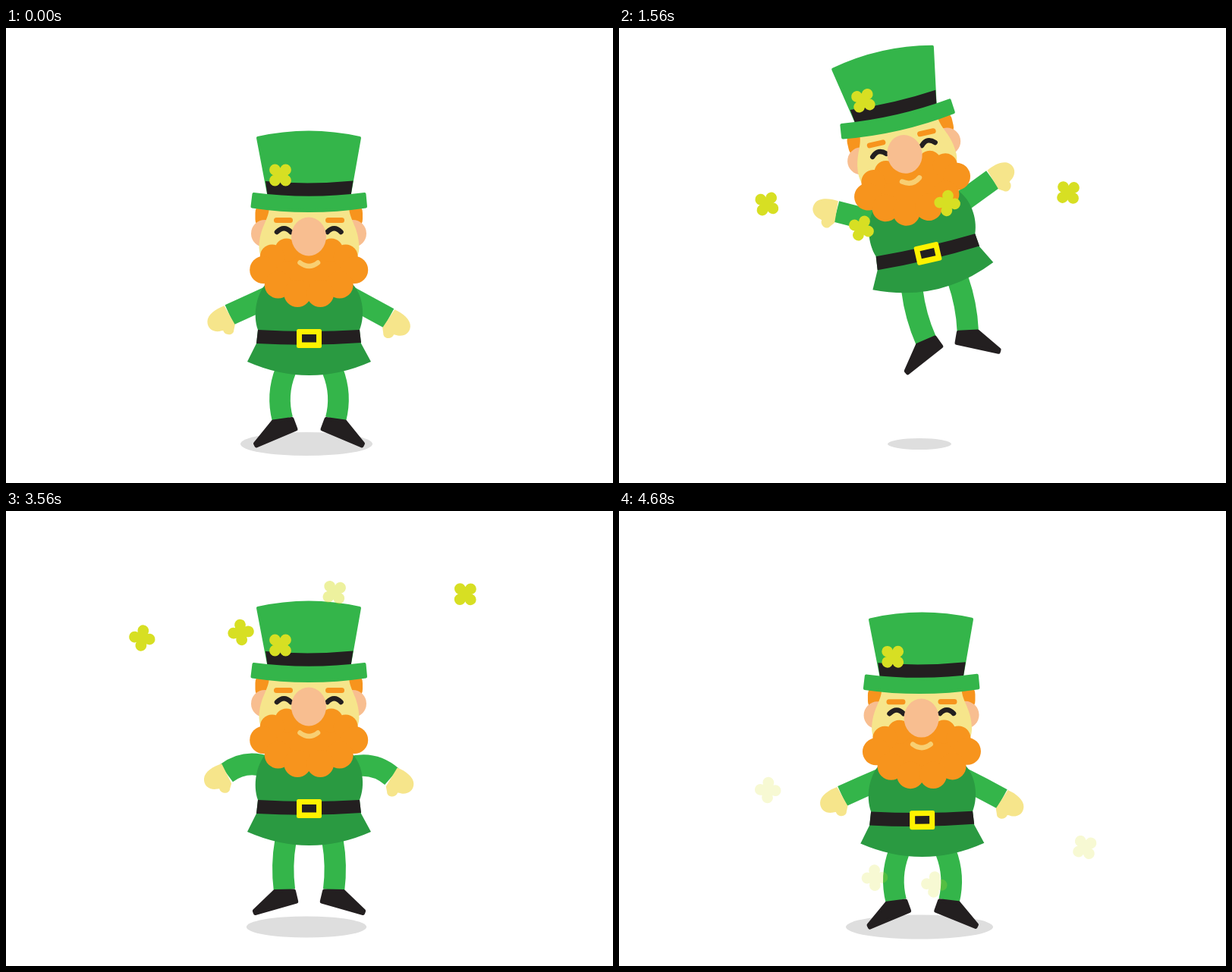
Recreate the animation shown at these times as an HTML page with a canvas. Size 800 px wide and 600 px high, loop 4720 ms.

```html
<!DOCTYPE html>
<html>
<head>
<meta charset="utf-8">
<style>
html, body { margin: 0; height: 100%; overflow: hidden; background: #fff; }
canvas { display: block; }
</style>
</head>
<body>
<canvas id="stage" width="800" height="600"></canvas>
<script>
const ctx = document.getElementById('stage').getContext('2d');
const LOOP = 2360, STEP = 40, CX = 399.5, CY = 409;
const GREEN = '#34b54a', DARK = '#2a9a41', BLACK = '#231f20', SKIN = '#f6e58b',
      PINK = '#f8be90', ORANGE = '#f7941d', LIME = '#d7df23';

// Limb positions are relative to the buckle, for the left side; swing shifts both feet sideways.
const stand = { dx: 0, dy: 0, tilt: 0, footX: -35, footY: 107, shoe: 0, swing: 0, handX: -105, handY: -28.5, elbow: 0 };
const crouch = { ...stand, dy: 6, footX: -39, footY: 101, shoe: -13, handX: -109, handY: -39, elbow: 15 };
const rise = { ...stand, dy: -17, footX: -32.5, footY: 108, shoe: 7, handX: -109, handY: -44, elbow: 15 };
const fly = { ...stand, dx: 7, dy: -112.5, tilt: -12.9, footX: -28.5, footY: 112, handY: -76 };
const kick = { ...fly, dx: 9.5, dy: -90, tilt: -11.85, footX: -27.5, footY: 101, shoe: -34, swing: 10.5, handY: -88 };
const land = { ...rise, dx: 3, dy: -34, tilt: -4.5, elbow: 6 };
const MOVES = [[0, stand], [440, crouch], [880, crouch], [1200, rise], [1520, fly], [1880, kick], [2140, land], [LOOP, stand]];

const CLOVERS = [
  { start: 470, x: 191.5, y: 232, speed: .179, sway: 14.5, low: 1030, period: 1850, turn: -9, spin: .076 },
  { start: 800, x: 325.5, y: 264, speed: .289, sway: 16, low: 1230, period: 1750, turn: 69, spin: .084 },
  { start: 1130, x: 416.4, y: 231, speed: .344, sway: 26, low: 2012, period: 1265, turn: 50, spin: .118 },
  { start: 890, x: 611, y: 217, speed: .298, sway: 20, low: 1680, period: 2350, turn: 4, spin: .009 }];

const clamp = v => Math.max(0, Math.min(1, v));
const smooth = v => (v = clamp(v)) * v * (3 - 2 * v);

// Monotone cubic blend between neighbouring poses
function poseAt(t) {
  let i = 0;
  while (t >= MOVES[i + 1][0]) i++;
  const slope = (k, key) => (MOVES[k + 1][1][key] - MOVES[k][1][key]) / (MOVES[k + 1][0] - MOVES[k][0]);
  const tangent = (k, key) => {
    if (k < 1 || k > MOVES.length - 2) return 0;
    const a = slope(k - 1, key), b = slope(k, key);
    return a * b > 0 ? 2 * a * b / (a + b) : 0;
  };
  const [[t0, from], [t1, to]] = MOVES.slice(i, i + 2);
  const span = t1 - t0, u = (t - t0) / span, v = 1 - u, pose = {};
  for (const key in from) {
    pose[key] = from[key] + (to[key] - from[key]) * smooth(u) +
      span * u * v * (tangent(i, key) * v - tangent(i + 1, key) * u);
  }
  return pose;
}

function fill(color, d, round = 0) {
  const path = new Path2D(d);
  ctx.fillStyle = ctx.strokeStyle = color;
  ctx.fill(path);
  if (round) {
    ctx.lineWidth = round;
    ctx.lineJoin = 'round';
    ctx.stroke(path);
  }
}
function line(color, width, d, cap = 'round') {
  ctx.strokeStyle = color;
  ctx.lineWidth = width;
  ctx.lineCap = cap;
  ctx.stroke(new Path2D(d));
}
function oval(color, x, y, rx, ry = rx) {
  ctx.fillStyle = color;
  ctx.beginPath();
  ctx.ellipse(x, y, rx, ry, 0, 0, 7);
  ctx.fill();
}
function rect(color, x, y, w, h, r) {
  ctx.fillStyle = color;
  ctx.beginPath();
  ctx.roundRect(x, y, w, h, r);
  ctx.fill();
}
function at(x, y, deg, draw) {
  ctx.save();
  ctx.translate(x, y);
  ctx.rotate(deg * Math.PI / 180);
  draw();
  ctx.restore();
}
function mirrored(draw) {
  for (const side of [1, -1]) {
    ctx.save();
    ctx.scale(side, 1);
    draw(side);
    ctx.restore();
  }
}

function clover(x, y, deg) {
  at(x, y, deg, () => {
    ctx.fillStyle = LIME;
    ctx.beginPath();
    for (const cx of [-7, 7]) for (const cy of [-7, 7]) {
      ctx.moveTo(cx, cy);
      ctx.arc(cx, cy, 7.4, 0, 2 * Math.PI);
    }
    ctx.rect(-6, -6, 12, 12);
    ctx.fill();
  });
}

// A tube from one joint to the other, bowed outwards
function limb(x0, y0, x1, y1, bend, width) {
  const dx = x1 - x0, dy = y1 - y0, length = Math.hypot(dx, dy);
  const kx = (x0 + x1) / 2 - dy / length * bend, ky = (y0 + y1) / 2 + dx / length * bend;
  line(GREEN, width, `M${x0} ${y0} Q${kx} ${ky} ${x1} ${y1}`, 'butt');
}

function leg(pose, side) {
  const hipX = -31, hipY = 43, length = 65;
  const x = pose.footX + pose.swing * side, y = pose.footY;
  const reach = Math.hypot(x - hipX, y - hipY);
  const bend = Math.max(5, Math.sqrt(Math.max(0, length ** 2 - reach ** 2)));
  limb(hipX, hipY, x, y, bend, 29 - bend * .13);
  at(x, y, pose.shoe - pose.swing * side * .4, () =>
    fill(BLACK, 'M-12.5 3 L12.5 -.5 L17.5 13 L-34.5 35 L-36 32 Z', 5));
}

function arm(pose, side) {
  const shoulder = -54, x = pose.handX, y = pose.handY - 2.3 * side;
  limb(shoulder, shoulder, x, y, pose.elbow, 28.5);
  const lift = Math.atan2(shoulder - y, shoulder - x) * 180 / Math.PI;
  at(x, y, 25 + lift * -1 * -1 - pose.elbow * .9, () => fill(SKIN,
    'M-7 -12 C-18 -8 -29 0 -29 9 C-29 18 -22 23 -13 22 Q-10 21 -8 21 C-6 28 6 28 6 20 L7.5 13 Z'));
}

function torso() {
  fill(DARK, 'M342 338 C330 352 325 378 332 398 L330 416 L318 440 Q400 476 481 440 L468 416 L466 398 C474 378 470 352 457 338 Z');
  fill(BLACK, 'M332 398 Q400 402 466 398 L468 415 Q400 420 330 416 Z');
  rect('#fff200', 383, 397, 33, 25, 2.5);
  rect(BLACK, 390, 404, 19, 10.5, 0);
}

function head() {
  rect(ORANGE, 328.5, 230, 141.5, 36, 14);
  oval(PINK, 341, 271, 18);
  oval(PINK, 457, 271, 18);
  fill(SKIN, 'M347 236 C346 255 334 262 333.5 290 Q335 310 350 320 L449 320 Q464 310 465.5 290 C465 262 453 255 452 236 Z');
  rect(ORANGE, 353, 250, 25, 7, 3.5);
  rect(ORANGE, 421, 250, 25, 7, 3.5);
  line(BLACK, 6.5, 'M357 269 Q366.5 259.5 375.5 269 M423.5 269 Q432.5 259.5 441.5 269');

  oval(ORANGE, 399.2, 317, 60, 33);
  for (const [dx, y, r] of [[29.5, 293, 15.5], [48.5, 301.5, 16], [60, 319, 18], [40.5, 338.5, 18], [15, 350, 18]]) {
    oval(ORANGE, 399.2 - dx, y, r);
    oval(ORANGE, 399.2 + dx, y, r);
  }
  line('#f8cf72', 6.5, 'M387.5 309.5 Q399.5 318.5 411 309.5');
  oval(PINK, 399, 275, 23, 25.5);
}

function hat() {
  fill(GREEN, 'M332 145 Q399 130 466 145 L452 224 L347 224 Z', 4);
  fill(BLACK, 'M342 202 Q400 207 457.5 201.5 L454 224 L345 224 Z');
  fill(GREEN, 'M326.5 219 Q399 228.5 472.5 219 L474 235.5 Q399 246.5 324.5 235.5 Z', 4);
  clover(361.5, 194, 0);
}

function shadow(t) {
  const width = t < 1560
    ? 174 + 18 * smooth(t / 440) - 108 * clamp((t - 440) / 1120) ** 3
    : 84 + 110 * clamp((t - 1560) / 760) ** 2.6;
  oval('#dedede', 396, 548.5, width / 2, Math.min(16, width * .089));
}

function draw(t) {
  ctx.clearRect(0, 0, 800, 600);
  shadow(t);

  const pose = poseAt(t);
  at(CX + pose.dx, CY + pose.dy, pose.tilt, () => {
    mirrored(side => leg(pose, side));
    mirrored(side => arm(pose, side));
    ctx.translate(-CX, -CY);
    torso();
    head();
    hat();
  });

  for (const c of CLOVERS) {
    const age = t - 1560;
    ctx.globalAlpha = clamp((t - c.start) / 160) * clamp((LOOP - t) / 200);
    clover(c.x - c.sway * Math.cos(2 * Math.PI * (t - c.low) / c.period),
      c.y + c.speed * age, c.turn + c.spin * age);
  }
  ctx.globalAlpha = 1;
}

const begin = performance.now();
function frame() {
  const t = (performance.now() - begin) % LOOP;
  draw(Math.floor(t / STEP) * STEP);
  requestAnimationFrame(frame);
}
frame();
</script>
</body>
</html>
```
